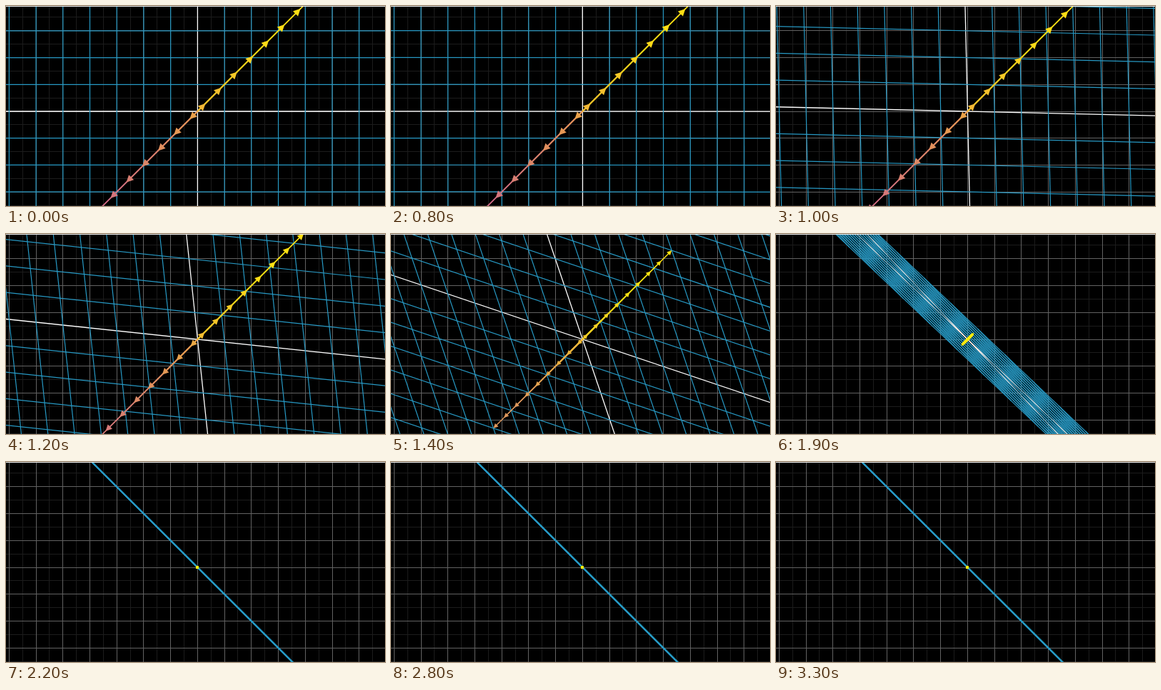
These frames come from a looping animation (531x281 px, 3.4 s). An HTML page with a canvas:

```html
<!DOCTYPE html>
<html lang="en">
<head>
<meta charset="utf-8">
<title>Plane collapsing onto a line</title>
<style>
  html, body { margin: 0; width: 100%; height: 100%; overflow: hidden; background: #000; }
  canvas { display: block; width: 531px; height: 281px; }
</style>
</head>
<body>
<canvas id="stage" width="531" height="281"></canvas>
<script>
const ctx = document.getElementById('stage').getContext('2d');
const W = 531, H = 281, UNIT = 37.72;
const CX = 268.4, CY = 148;
const LOOP = 3400, STEP = 100, START = 786, LENGTH = 1416;
const COLS = 14, ROWS = 8, VECTORS = 18;
const PINK = [208, 108, 134], ORANGE = [236, 165, 70], GOLD = [255, 222, 20], YELLOW = [255, 238, 10];

const clamp = x => Math.min(1, Math.max(0, x));
const mix = (a, b, k) => a.map((v, i) => v + (b[i] - v) * k);

// Normalised logistic easing
function smooth(s) {
  const sig = x => 1 / (1 + Math.exp(-x));
  const edge = sig(-5);
  return clamp((sig(10 * (clamp(s) - 0.5)) - edge) / (1 - 2 * edge));
}

function line(x1, y1, x2, y2, color, width) {
  ctx.strokeStyle = color;
  ctx.lineWidth = width;
  ctx.beginPath();
  ctx.moveTo(x1, y1);
  ctx.lineTo(x2, y2);
  ctx.stroke();
}

function backdrop() {
  ctx.fillStyle = '#000';
  ctx.fillRect(0, 0, W, H);
  for (const odd of [1, 0]) {
    ctx.fillStyle = odd ? '#1c1c1c' : '#626262';
    for (let n = -16 + odd; n <= 16; n += 2) {
      const d = n * UNIT / 2;
      ctx.fillRect(Math.floor(CX + d), 0, 1, H);
      ctx.fillRect(0, Math.floor(CY + d), W, 1);
    }
  }
}

// Applies the matrix [[1, -t], [-t, 1]]
function planeLine(x1, y1, x2, y2, t, color, width) {
  const px = (x, y) => CX + UNIT * (x - t * y);
  const py = (x, y) => CY - UNIT * (y - t * x);
  line(px(x1, y1), py(x1, y1), px(x2, y2), py(x2, y2), color, width);
}

function plane(t) {
  const across = (y, ...pen) => planeLine(-COLS, y, COLS, y, t, ...pen);
  const upright = (x, ...pen) => planeLine(x, -ROWS, x, ROWS, t, ...pen);
  across(0, '#fff', 1.3);
  upright(0, '#fff', 1.3);
  for (let n = 1; n <= COLS; n++) {
    for (const k of [-n, n]) {
      upright(k, '#2799c4', 1.2);
      if (n <= ROWS) across(k, '#2799c4', 1.2);
    }
  }
}

function vectorColor(v, t) {
  const base = v < 0 ? mix(ORANGE, PINK, clamp(-v * 1.3)) : mix(ORANGE, GOLD, clamp(0.25 + v * 1.3));
  return `rgb(${mix(base, YELLOW, t).map(Math.round)})`;
}

function arrow(v, t) {
  const reach = Math.abs(v) * 5 * UNIT * Math.SQRT2 * (1 - t);
  const size = Math.max(10 * (1 - t), 3.5);
  const head = Math.min(size, reach);
  const color = vectorColor(v, t);
  ctx.save();
  ctx.translate(CX, CY);
  ctx.rotate(v > 0 ? -Math.PI / 4 : Math.PI * 3 / 4);
  line(0, 0, reach - head / 2, 0, color, reach < 66 ? 1.4 + 2.1 * t : 1.4);
  ctx.fillStyle = color;
  ctx.beginPath();
  ctx.moveTo(reach, 0);
  ctx.lineTo(reach - head, size / 2);
  ctx.lineTo(reach - head, -size / 2);
  ctx.fill();
  ctx.restore();
}

function vectors(t) {
  // Longest first, so the short ones lie on top
  for (let n = VECTORS - 1; n > 0; n -= 2) {
    const v = n / (VECTORS - 1);
    arrow(-v, t);
    arrow(v, t);
  }
  if (t > 0.97) {
    ctx.fillStyle = '#f4ee0a';
    ctx.fillRect(266, 146, 4, 4);
  }
}

function draw(now) {
  const time = Math.floor((now % LOOP) / STEP) * STEP;
  const t = smooth((time - START) / LENGTH);
  backdrop();
  plane(t);
  vectors(t);
  ctx.fillStyle = '#e8e8e8';
  ctx.fillRect(0, 0, W, 1);
}

const begin = performance.now();
function tick() {
  draw(performance.now() - begin);
  requestAnimationFrame(tick);
}
tick();
</script>
</body>
</html>
```
